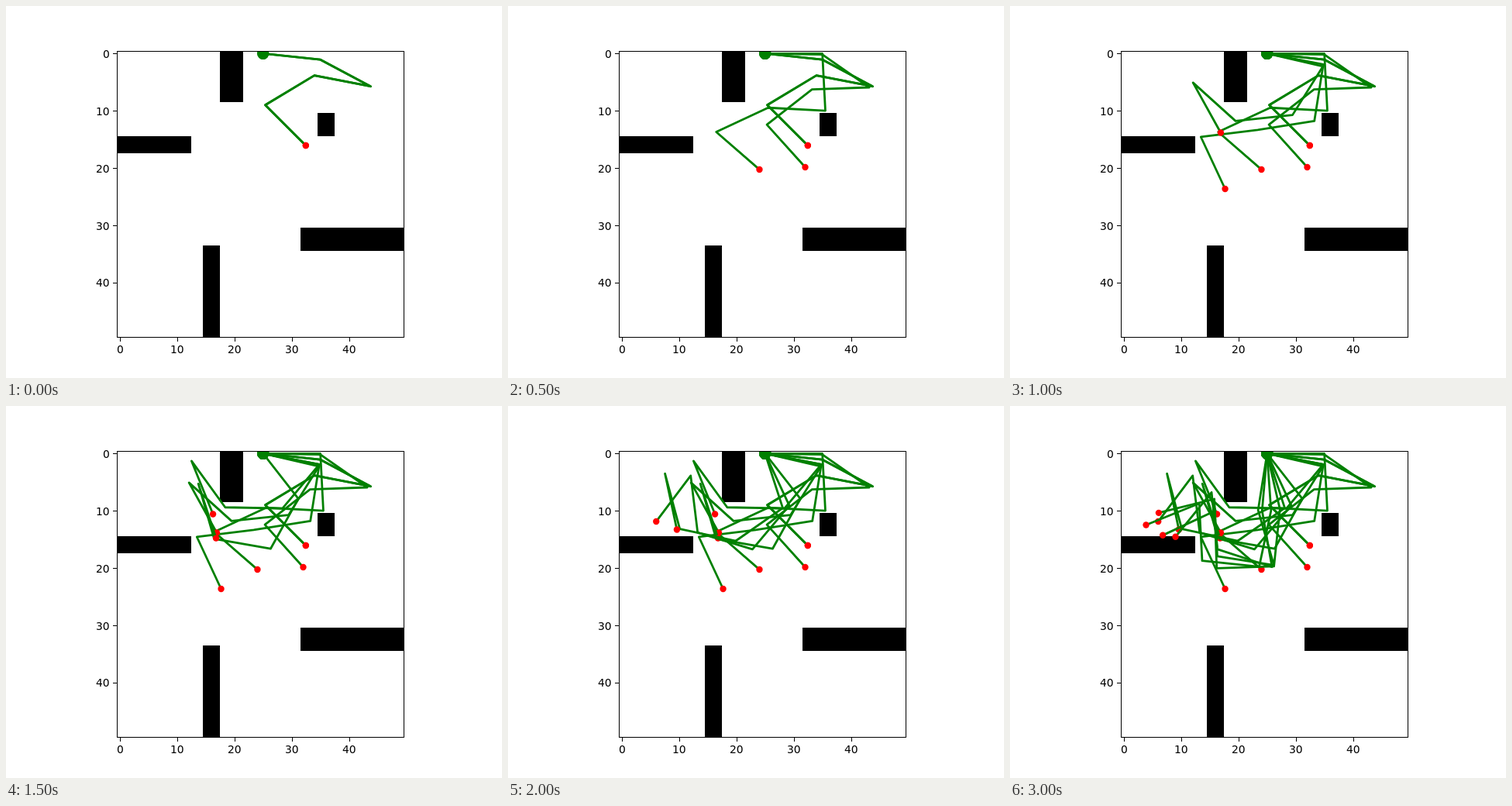
Animation, 640 px wide and 480 px high, one loop 3.25 s. Source, as an HTML page with a canvas:

```html
<!DOCTYPE html>
<html lang="en">
<head>
<meta charset="utf-8">
<title>Arm poses</title>
<style>
html, body { margin: 0; width: 640px; height: 480px; overflow: hidden; background: #fff; }
canvas { display: block; }
</style>
</head>
<body>
<canvas id="stage" width="640" height="480"></canvas>
<script>
const ctx = document.getElementById("stage").getContext("2d");
const STEP = 250;
const UNIT = 7.392;                 // pixels per grid cell
const LINK = 10 * UNIT;             // every link is ten cells long
const ORIGIN = { x: 146.9, y: 61.3 };
const SHOULDER = { x: ORIGIN.x + 25 * UNIT, y: ORIGIN.y };
const GREEN = "#008000";

// Heading of each link in degrees, clockwise from the x axis
const poses = [
  [6, 28, 191, 149, 45],
  [1, 35, 178, 142, 48],
  [0, 87, 183, 155, 41],
  [11, 99, 171, 173, 65],
  [13, 122, 174, 222, 61],
  [11, 130, 181, 234, 68],
  [52, 119, 190, 254, 72],
  [72, 145, 192, 255, 78],
  [65, 130, 197, 263, 127],
  [95, 80, 198, 264, 129],
  [99, 74, 189, 267, 166],
  [86, 102, 186, 267, 158],
  [77, 96, 178, 268, 155]
];

function dot(p, r, color) {
  ctx.fillStyle = color;
  ctx.beginPath();
  ctx.arc(p.x, p.y, r, 0, Math.PI * 2);
  ctx.fill();
}

function drawArm(headings) {
  let { x, y } = SHOULDER;
  ctx.beginPath();
  ctx.moveTo(x, y);
  for (const deg of headings) {
    const a = deg * Math.PI / 180;
    x += LINK * Math.cos(a);
    y += LINK * Math.sin(a);
    ctx.lineTo(x, y);
  }
  ctx.stroke();
  dot(SHOULDER, 7.6, GREEN);
  dot({ x, y }, 4.2, "#f00");
}

// Obstacle given by its first cell and its size in cells
function block(col, row, cols, rows) {
  const px = c => Math.round(143 + c * 7.4);
  const py = r => Math.round(57 + r * 7.4);
  ctx.fillRect(px(col), py(row), px(col + cols) - px(col), py(row + rows) - py(row));
}

function drawBlocks() {
  ctx.fillStyle = "#000";
  block(18, 0, 4, 9);
  block(35, 11, 3, 4);
  block(0, 15, 13, 3);
  block(32, 31, 18, 4);
  block(15, 34, 3, 16);
}

// Text on whole pixels; align is the share of its width left of x
function label(text, x, y, align) {
  const w = ctx.measureText(text).width;
  ctx.fillText(text, Math.round(x - w * align), Math.round(y));
}

function drawAxes() {
  ctx.strokeStyle = ctx.fillStyle = "#000";
  ctx.lineWidth = 1;
  ctx.lineJoin = "miter";
  ctx.strokeRect(143.5, 58.5, 370, 369);
  ctx.font = '13.89px "DejaVu Sans", sans-serif';
  for (let v = 0; v <= 40; v += 10) {
    const x = ORIGIN.x + v * UNIT, y = ORIGIN.y + v * UNIT;
    ctx.fillRect(Math.round(x), 428, 1, 5);
    ctx.fillRect(138, Math.round(y), 5, 1);
    label(v, x + 0.2, 448, 0.5);
    label(v, 133.5, y + 5.5, 1);
  }
}

function draw(time) {
  const last = Math.floor(time / STEP) % poses.length;
  ctx.fillStyle = "#fff";
  ctx.fillRect(0, 0, 640, 480);
  ctx.save();
  ctx.beginPath();
  ctx.rect(143, 58, 370, 369);
  ctx.clip();
  drawBlocks();
  ctx.strokeStyle = GREEN;
  ctx.lineWidth = 2.78;
  ctx.lineJoin = "round";
  ctx.lineCap = "square";
  drawArm(poses[0]); // the starting pose is laid down twice
  poses.slice(0, last + 1).forEach(drawArm);
  ctx.restore();
  drawAxes();
}

const start = performance.now();
function tick() {
  draw(Math.max(0, performance.now() - start));
  requestAnimationFrame(tick);
}
tick();
</script>
</body>
</html>
```
